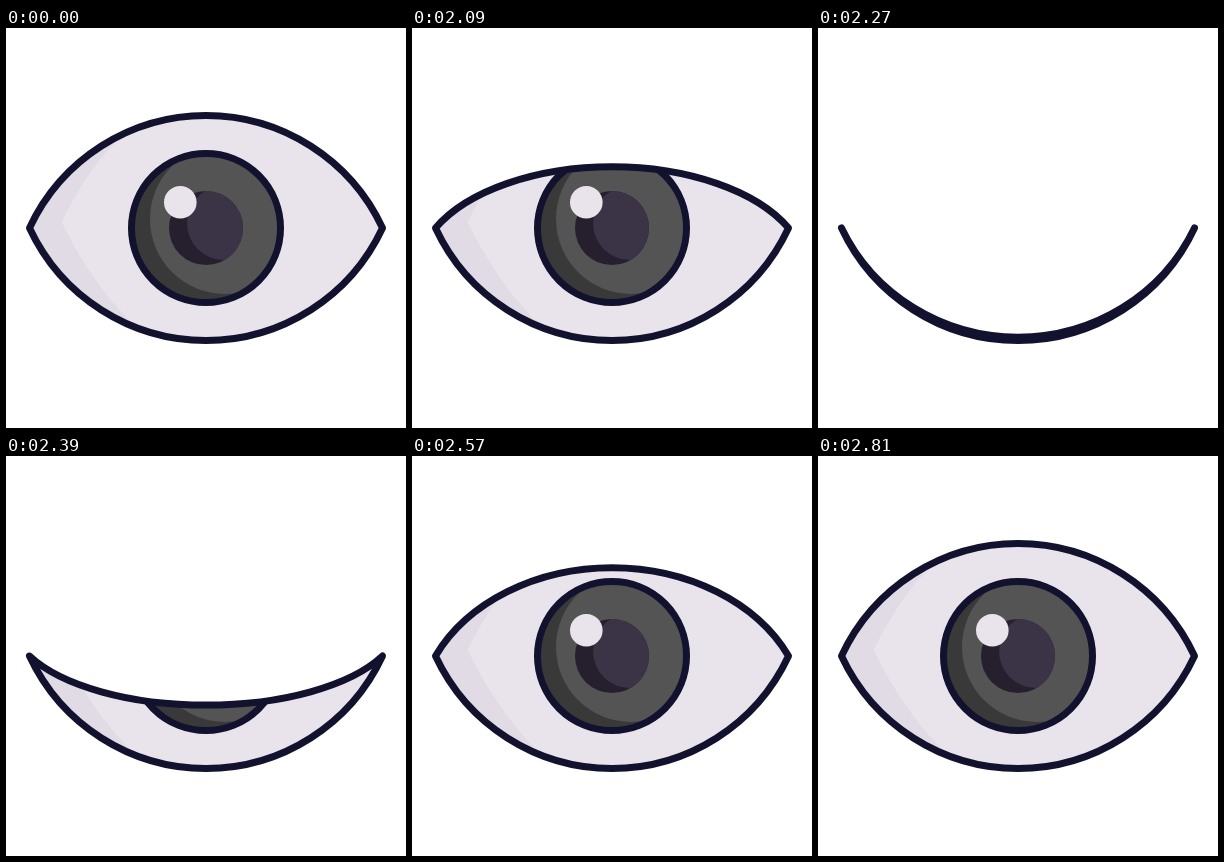
These frames come from a looping animation (400 by 400 pixels, 2.84 s). An HTML page with a canvas:

```html
<!DOCTYPE html>
<html lang="en">
<head>
<meta charset="utf-8">
<title>Blinking eye</title>
<style>
  html, body { margin: 0; width: 100%; height: 100%; overflow: hidden; background: #fff; }
  canvas { display: block; width: 100vw; height: 100vh; }
</style>
</head>
<body>
<canvas id="stage" width="400" height="400"></canvas>
<script>
const canvas = document.getElementById('stage');
const ctx = canvas.getContext('2d');

const LOOP = 2840, REST = 2030, STEP = 30;
const SHUT_END = 9.7, OPEN_END = 27; // in steps after the rest
const CX = 200, CY = 200, HALF = 176.5, SAG = 112.5;
const INK = '#12122f', WHITE = '#e9e4eb', SHADE = '#e1dbe5';

const smooth = s => s * s * (3 - 2 * s);

// cubic-bezier(1/3, 0, 0, 1)
function settle(u) {
  let lo = 0, hi = 1;
  for (let i = 0; i < 24; i++) {
    const s = (lo + hi) / 2;
    if (s * (1 - s) * (1 - s) + s * s * s < u) lo = s;
    else hi = s;
  }
  return smooth(lo);
}

// 0 = wide open, 1 = shut
function closedness(t) {
  if (t < REST) return 0;
  const n = Math.floor((t - REST) / STEP) + 1;
  if (n <= SHUT_END) return smooth(n / SHUT_END);
  if (n >= OPEN_END) return 0;
  return 1 - settle((n - SHUT_END) / (OPEN_END - SHUT_END));
}

// Lid curve between the corners; k = 1 bulges down, -1 up, dir sets the direction
function lid(k, dir) {
  const x = v => CX + dir * v, y = v => CY + k * v;
  ctx.bezierCurveTo(x(-HALF + 32), y(68.6), x(-75.7), y(SAG), CX, y(SAG));
  ctx.bezierCurveTo(x(75.7), y(SAG), x(HALF - 32), y(68.6), x(HALF), CY);
}

function eyePath(k) {
  ctx.beginPath();
  ctx.moveTo(CX - HALF, CY);
  lid(k, 1);
  lid(1, -1);
  ctx.closePath();
}

function disc(x, y, r, fill) {
  ctx.beginPath();
  ctx.arc(x, y, r, 0, Math.PI * 2);
  ctx.fillStyle = fill;
  ctx.fill();
}

// Dark disc with a lighter, shifted disc clipped inside it
function shadedDisc(r, dark, light, x, y, r2) {
  ctx.save();
  disc(CX, CY, r, dark);
  ctx.clip();
  disc(x, y, r2, light);
  ctx.restore();
}

function drawInside() {
  ctx.fillStyle = WHITE;
  ctx.fillRect(0, 0, 400, 400);

  ctx.beginPath();
  ctx.moveTo(0, 112);
  ctx.lineTo(112, 112);
  ctx.lineTo(106, 118);
  ctx.quadraticCurveTo(79.7, 145.6, 56, 193);
  ctx.lineTo(56, 195);
  ctx.quadraticCurveTo(86, 255, 122, 291);
  ctx.lineTo(130, 299);
  ctx.lineTo(0, 299);
  ctx.fillStyle = SHADE;
  ctx.fill();

  shadedDisc(74.5, '#393939', '#545454', 219, 191, 75);
  shadedDisc(37, '#251f2e', '#3a3446', 218, 195, 37);
  disc(174.3, 174.3, 16.3, WHITE);

  ctx.beginPath();
  ctx.arc(CX, CY, 74.5, 0, Math.PI * 2);
  ctx.stroke();
}

function draw(t) {
  const size = Math.min(innerWidth, innerHeight) * (devicePixelRatio || 1);
  const px = Math.round(size) || 400;
  if (canvas.width !== px) canvas.width = canvas.height = px;
  ctx.setTransform(px / 400, 0, 0, px / 400, 0, 0);
  ctx.fillStyle = '#fff';
  ctx.fillRect(0, 0, 400, 400);
  ctx.strokeStyle = INK;
  ctx.lineWidth = 7;
  ctx.lineJoin = ctx.lineCap = 'round';

  const k = 2 * closedness(t) - 1;
  ctx.save();
  eyePath(k);
  ctx.clip();
  drawInside();
  ctx.restore();
  eyePath(k);
  ctx.stroke();
}

const start = performance.now();
function tick() {
  draw((performance.now() - start) % LOOP);
  requestAnimationFrame(tick);
}
tick();
</script>
</body>
</html>
```
